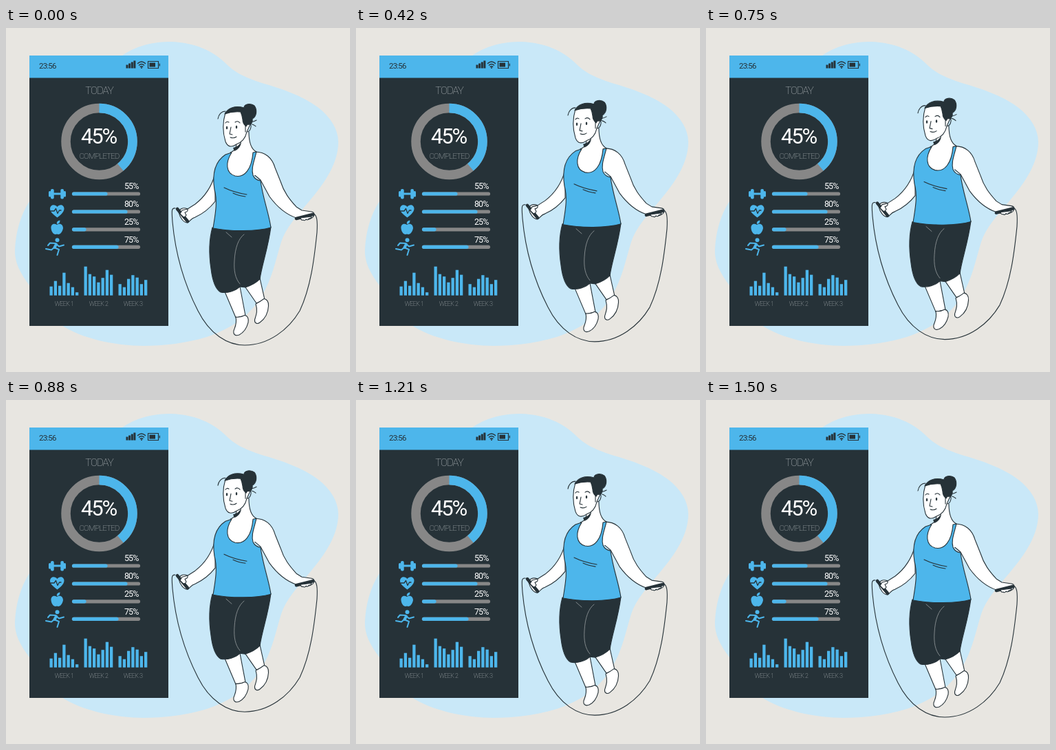
An HTML page that plays this animation: 500 by 500 pixels, repeating every 1.54 s.

```html
<!DOCTYPE html>
<html lang="en">
<head>
<meta charset="utf-8">
<title>Workout tracker</title>
<style>
  html, body { margin: 0; width: 100%; height: 100%; overflow: hidden; background: #e8e6e1; }
  svg { display: block; width: 100vw; height: 100vh; }
  text { font-family: Roboto, "Open Sans", sans-serif; font-stretch: 75%; letter-spacing: -.07em; fill: #fff; }
  .mid { text-anchor: middle; }
  .end { text-anchor: end; }
  .thin { font-weight: 100; fill: #c3c8ca; }
  .blue { fill: #4db6eb; }
  .dark { fill: #263238; }
  .line { fill: none; stroke: #263238; stroke-linecap: round; stroke-linejoin: round; }
  #woman { stroke: #263238; stroke-width: 1.1; stroke-linecap: round; stroke-linejoin: round; fill: #fff; }
  #woman .seam { fill: none; stroke: #8b9194; stroke-width: .9; }
</style>
</head>
<body>
<svg viewBox="0 0 500 500">
  <path fill="#c9e8f8" d="M165 43C188 25 215 20 240 20C275 21 302 34 320 52C332 64 345 71 372 80C400 88 430 98 453 115C473 130 483 149 483 166C483 194 466 222 443 249C422 274 407 290 400 311C392 337 387 364 372 389C354 419 327 437 292 449C263 458 229 462 200 462C158 462 109 451 81 432L34 374C21 357 12 340 13 322C14 297 21 272 34 252Z"/>

  <g id="phone">
    <path class="dark" d="M34 40H236V433H34Z"/>
    <path class="blue" d="M34 40H236V72.400H34Z"/>
    <text x="48" y="58.800" font-size="11.500" style="fill:#263238">23:56</text>
    <path class="dark" d="M174.500 53.500h3v5h-3zM178.100 51.500h3v7h-3zM181.800 49.500h3v9h-3zM185.400 47.500h3v11h-3z"/>
    <path class="line" stroke-width="1.500" d="M191.500 51.500Q197 46.500 202.500 51.500M193.500 54Q197 51 200.500 54M195.300 56.300Q197 55 198.700 56.300"/>
    <circle class="dark" cx="197" cy="58" r="1"/>
    <path class="line" stroke-width="1.200" d="M206.500 48.500H221.500V58.500H206.500ZM223.300 52V55"/>
    <path class="dark" d="M208.500 50.500H217V56.500H208.500Z"/>

    <text class="mid thin" x="135.500" y="96" font-size="15">TODAY</text>
    <g fill="none" stroke-width="13.500" transform="rotate(-90 135.500 165)">
      <circle cx="135.500" cy="165" r="48.500" stroke="#878787"/>
      <circle cx="135.500" cy="165" r="48.500" stroke="#4db6eb" pathLength="100" stroke-dasharray="39 100"/>
    </g>
    <text class="mid" x="134.500" y="168" font-size="31">45%</text>
    <text class="mid thin" x="135.500" y="189.500" font-size="11.500">COMPLETED</text>

    <g class="blue">
      <path d="M67 239.500H82V242.500H67Z"/>
      <rect x="65" y="234" width="4.700" height="14.500" rx="2"/>
      <rect x="79.300" y="234" width="4.700" height="14.500" rx="2"/>
      <rect x="62" y="237" width="3.500" height="8.500" rx="1.500"/>
      <rect x="83.500" y="237" width="3.500" height="8.500" rx="1.500"/>
      <path d="M74.500 275.500C66 269 64 266 64 262.500C64 257 71 255 74.500 260C78 255 84.500 257 84.500 262.500C84.500 266 82 270 74.500 275.500Z"/>
      <path d="M74 286C69 283 65 286 65.500 291C66 297 70 301.500 74 299.500C78 301.500 82 297 83 291C83 286 79 283 74 286Z"/>
      <path d="M74 285C73 281 76 280 78.500 279.500C78.500 283 77 284.500 74 285Z"/>
      <circle cx="74.500" cy="308.200" r="3"/>
      <g fill="none" stroke="#4db6eb" stroke-linecap="round" stroke-linejoin="round">
        <path stroke-width="2" d="M61 316L64 312.500L72 313L77 317.500L84 315.500M58 321L66 322.500L70 319L77 322L74.500 330"/>
        <path stroke-width="4" d="M73 314.500L70.500 319"/>
      </g>
    </g>
    <path class="line" stroke-width="1.300" d="M65 266H70L72.500 262.500L75 269.500L77.500 265H80"/>
    <g id="meters" stroke-width="5.200" stroke-linecap="round"></g>
    <g id="charts"></g>
  </g>

  <g id="woman">
    <path class="line" d="M246 262C240 261 241 267 242 282C246 326 258 370 279 411C296 445 322 461 347 461C382 461 411 438 427 411C443 377 448 336 452 297C453 280 452 272 447 270"/>

    <!-- Legs and shoes -->
    <path d="M346 374L364 400L376 395L369 364Z"/>
    <path d="M363 401Q369 398 375 393.500C379 394 382 398 381.500 404C381 414 376 423 369 428C365 431 361 429 361.500 424C364 416 366 411 363 401Z"/>
    <path d="M317 381L334 421L348 418L340 376Z"/>
    <path d="M334 420Q341 421 347 417.500C351 418 353 422 352 428C350 436 345 443 339 446C334 448 330 446 331 440C333 434 336 430 334 420Z"/>

    <!-- Arms -->
    <path d="M304 212C299 230 288 246 275 256L264 263C257 260 252 263 251 268C253 276 258 283 264 283C269 280 268 277 275 275C286 270 297 261 304 252Z"/>
    <path d="M362 180C377 180 387 189 391 203L399 223C404 239 412 249 422 260L430 265L444 267C449 268 449 272 446 275C439 281 429 278 422 276C407 271 394 260 383 245L370 221L358 211Z"/>

    <!-- Neck and chest -->
    <path stroke="none" d="M335 168L352 148C353 162 355 174 363 180L364 213L340 222L318 210L321 184Q332 181 335 168Z"/>
    <path class="line" d="M335 170Q333 179 326 181M353 151C353 165 356 176 364 180"/>

    <!-- Trousers and top -->
    <path class="dark" d="M300 290C295 308 295 330 298 350C300 367 305 380 312 384C322 386 334 382 340 376L348 377Q361 373 369 365C372 344 381 320 385 289Z"/>
    <path class="seam" d="M346 300C338 306 333 319 332 338C331 352 333 364 340 372M320 297L328 304"/>
    <path class="blue" d="M319 184L328 181C319 195 319 211 333 215C347 218 357 205 359 181L364 180C361 193 356 204 359 214Q362 221 370 222C373 246 382 269 385 290C365 296 326 296 301 291C304 271 308 253 303 235C300 216 302 195 319 184Z"/>
    <path class="line" d="M317 232C327 237 338 240 350 242M330 240Q338 244 348 245"/>

    <!-- Head -->
    <path d="M319 123C315 136 315 152 319 165C322 173 328 174 335 169Q347 165 350 151L355 140L346 118Z"/>
    <path class="dark" stroke="none" d="M330 174C336 173 340 169 342 165C342 172 337 177 332 179Z"/>
    <path class="dark" d="M318 125C322 117 332 112 346 116C346 110 356 109 361 113C365 118 365 128 358 132C359 138 355 141 351 140L349 143Q344 139 344 133Q343 126 341 122Q329 121 318 125Z"/>
    <path class="line" d="M319 121C313 121 309 126 308 132M355 137Q361 136 364 134M354 139Q360 140 363 143M348 142V151M352 140Q357 139 356 144Q355 150 351 151"/>
    <path class="line" d="M319 138Q321 135 324 137M333 137Q337 134 340 138M327 144L325 154L329 155M326 159Q331 161 335 158"/>
    <ellipse class="dark" cx="321" cy="145" rx=".7" ry="1.700"/>
    <ellipse class="dark" cx="335" cy="144" rx=".7" ry="1.700"/>

    <!-- Handles and fingers -->
    <path class="line" stroke-width="4.600" d="M249 263L264 281"/>
    <path class="line" stroke-width="4.600" d="M422 277L446 271"/>
    <path d="M256 265L264 263Q265 267 260 268L262 272Q260 276 257 274L253 270Z"/>
    <path d="M428 276Q429 280 432 279Q434 281 436 278Q439 280 440 277Q444 277 444 274Z"/>
  </g>
</svg>
<script>
  const byId = id => document.getElementById(id);

  // Label, height on the page, end of the filled part
  const meters = [["55%", 241, 147], ["80%", 267, 176], ["25%", 292.800, 116], ["75%", 318.300, 163]];
  byId("meters").innerHTML = meters.map(([label, y, end]) => `
    <path stroke="#878787" d="M98.500 ${y}H192.500"/>
    <path stroke="#4db6eb" d="M98.500 ${y}H${end - 2}"/>
    <text class="end" x="192.500" y="${y - 6.700}" font-size="12.500" stroke="none">${label}</text>`).join("");

  const weeks = [
    [13, 21, 14, 33, 18, 12, 4.500],
    [42, 31, 27.500, 19, 25.500, 37, 30],
    [16.500, 12, 24, 29.500, 26, 16.500, 22.500]
  ];
  byId("charts").innerHTML = weeks.map((bars, week) => {
    const left = 63.500 + week * 50;
    const rects = bars.map((h, i) =>
      `<rect class="blue" x="${left + i * 6.250}" y="${388.700 - h}" width="4.300" height="${h}"/>`);
    return rects.join("") +
      `<text class="mid thin" x="${left + 21}" y="403.500" font-size="9">WEEK ${week + 1}</text>`;
  }).join("");

  const LOOP = 1540, RISE = 8.400;
  function draw(now) {
    const phase = (now + 20) % LOOP / LOOP;
    const lift = RISE * (1 - Math.cos(phase * 2 * Math.PI)) / 2;
    byId("woman").setAttribute("transform", `translate(0 ${-lift})`);
    requestAnimationFrame(draw);
  }
  requestAnimationFrame(draw);
</script>
</body>
</html>
```
